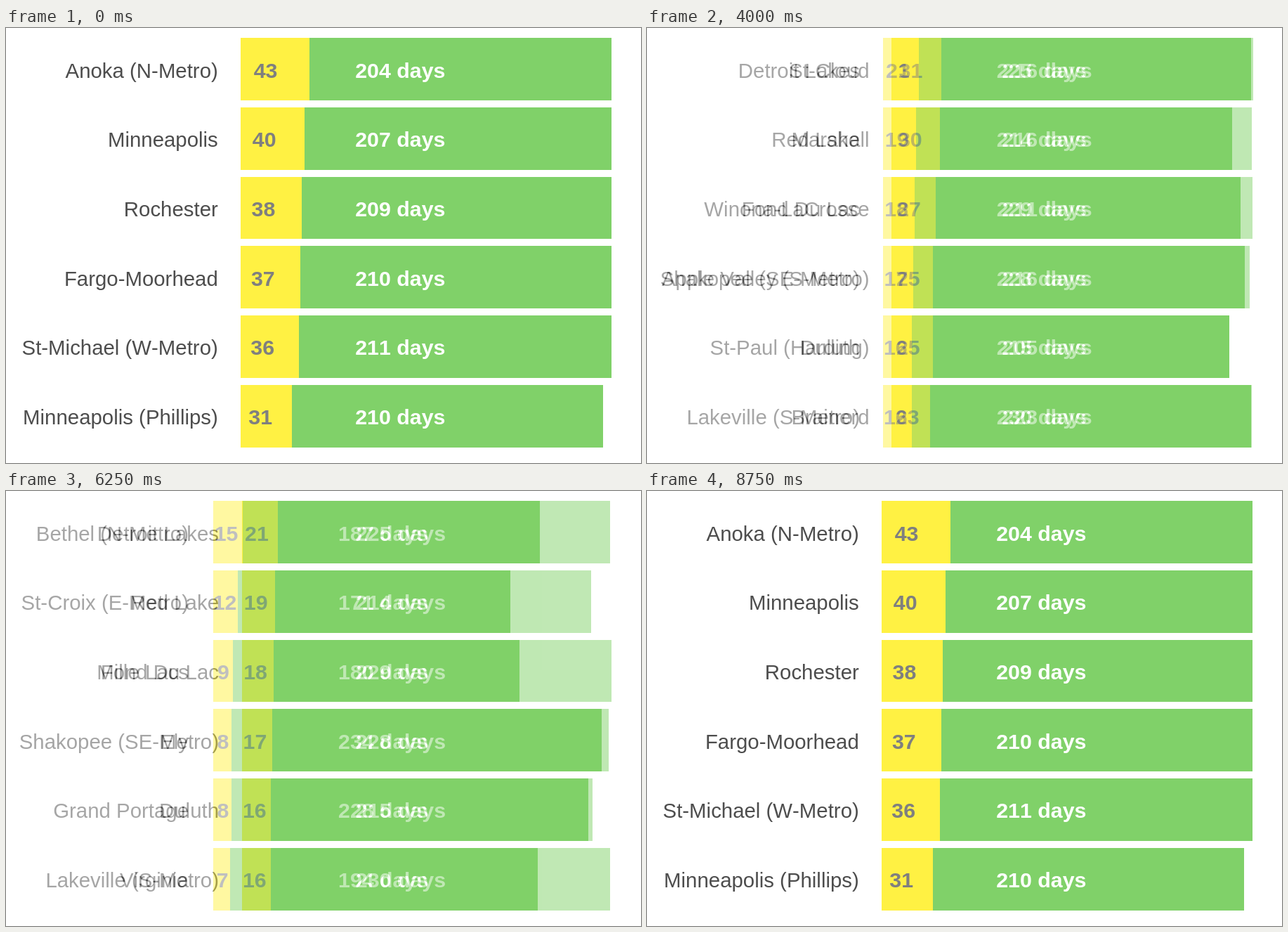
Animation of 904x619 px, one loop 9 s. Source, as an HTML page:

```html
<!DOCTYPE html>
<html lang="en">
<head>
<meta charset="utf-8">
<title>Days by city</title>
<style>
  html, body { margin: 0; width: 100%; height: 100%; overflow: hidden; background: #fff; }
  svg { display: block; width: 904px; height: 619px; }
  text { font-family: "Liberation Sans", Arial, sans-serif; font-kerning: none; }
  .label { font-size: 29.4px; fill: #4d4d4d; text-anchor: end; }
  .count, .days { font-size: 30.35px; font-weight: bold; text-anchor: middle; }
  .count { fill: #7f7f7f; }
  .days { fill: #fff; }
  .bad { fill: #fff143; }
  .good { fill: #80d169; }

  /* The first page stays underneath; the others cover it, half-blended for 250 ms. */
  .page { animation: 9s step-end infinite; }
  .p1 { animation-name: second; }
  .p2 { animation-name: third; }
  .p3 { animation-name: fourth; }
  @keyframes second {
    0% { opacity: 0; } 19.444% { opacity: .5; } 22.222% { opacity: 1; }
    47.222%, 100% { opacity: 0; }
  }
  @keyframes third {
    0% { opacity: 0; } 44.444% { opacity: .5; } 47.222% { opacity: 1; }
    72.222%, 100% { opacity: 0; }
  }
  @keyframes fourth {
    0% { opacity: 0; } 69.444% { opacity: .5; } 72.222% { opacity: 1; }
    94.444% { opacity: .5; } 97.222%, 100% { opacity: 0; }
  }
</style>
</head>
<body>
<svg id="chart" viewBox="0 0 904 619"></svg>
<script>
  // zero: x of the value 0, scale: pixels per day
  const pages = [
    { labelEnd: 301.8, start: 334, zero: 343, scale: 2.06, rows: [
      ["Anoka (N-Metro)", 43, 204], ["Minneapolis", 40, 207],
      ["Rochester", 38, 209], ["Fargo-Moorhead", 37, 210],
      ["St-Michael (W-Metro)", 36, 211], ["Minneapolis (Phillips)", 31, 210]] },
    { labelEnd: 316.6, start: 348, zero: 356.8, scale: 2.008, rows: [
      ["St-Cloud", 31, 216], ["Marshall", 30, 216],
      ["Winona-LaCrosse", 27, 211], ["Apple Valley (S-Metro)", 25, 216],
      ["St-Paul (Harding)", 25, 205], ["Brainerd", 23, 223]] },
    { labelEnd: 303, start: 336, zero: 344, scale: 2.056, rows: [
      ["Detroit Lakes", 21, 225], ["Red Lake", 19, 214],
      ["Fond Du Lac", 18, 229], ["Shakopee (SE-Metro)", 17, 228],
      ["Duluth", 16, 215], ["Lakeville (S-Metro)", 16, 230]] },
    { labelEnd: 260, start: 295, zero: 303.6, scale: 2.203, rows: [
      ["Bethel (N-Metro)", 15, 187], ["St-Croix (E-Metro)", 12, 171],
      ["Mille Lacs", 9, 180], ["Ely", 8, 234],
      ["Grand Portage", 8, 228], ["Virginia", 7, 194]] }
  ];
  const pitch = 98.7, firstTop = 14.2, barHeight = 88.8, firstBase = 70.5;

  const rect = (cls, x1, x2, y1, y2) =>
    `<rect class="${cls}" x="${x1}" y="${y1}" width="${x2 - x1}" height="${y2 - y1}"/>`;
  const text = (cls, x, y, str) =>
    `<text class="${cls}" x="${x}" y="${y}">${str}</text>`;

  function drawRow(page, [name, bad, good], i) {
    const at = days => page.zero + page.scale * days;
    const top = Math.round(firstTop + pitch * i);
    const bottom = Math.round(firstTop + pitch * i + barHeight);
    const base = Math.round(firstBase + pitch * i);
    const split = Math.round(at(bad));
    const end = Math.round(at(bad + good + 5));
    return rect("bad", page.start, split, top, bottom)
      + rect("good", split, end, top, bottom)
      + text("label", page.labelEnd, base, name)
      + text("count", at(bad * 0.3), base, bad)
      + text("days", at(106), base, good + " days");
  }

  document.getElementById("chart").innerHTML = pages.map((page, k) =>
    `<g class="page p${k}"><rect width="904" height="619" fill="#fff"/>`
    + page.rows.map((row, i) => drawRow(page, row, i)).join("") + "</g>").join("");
</script>
</body>
</html>
```
